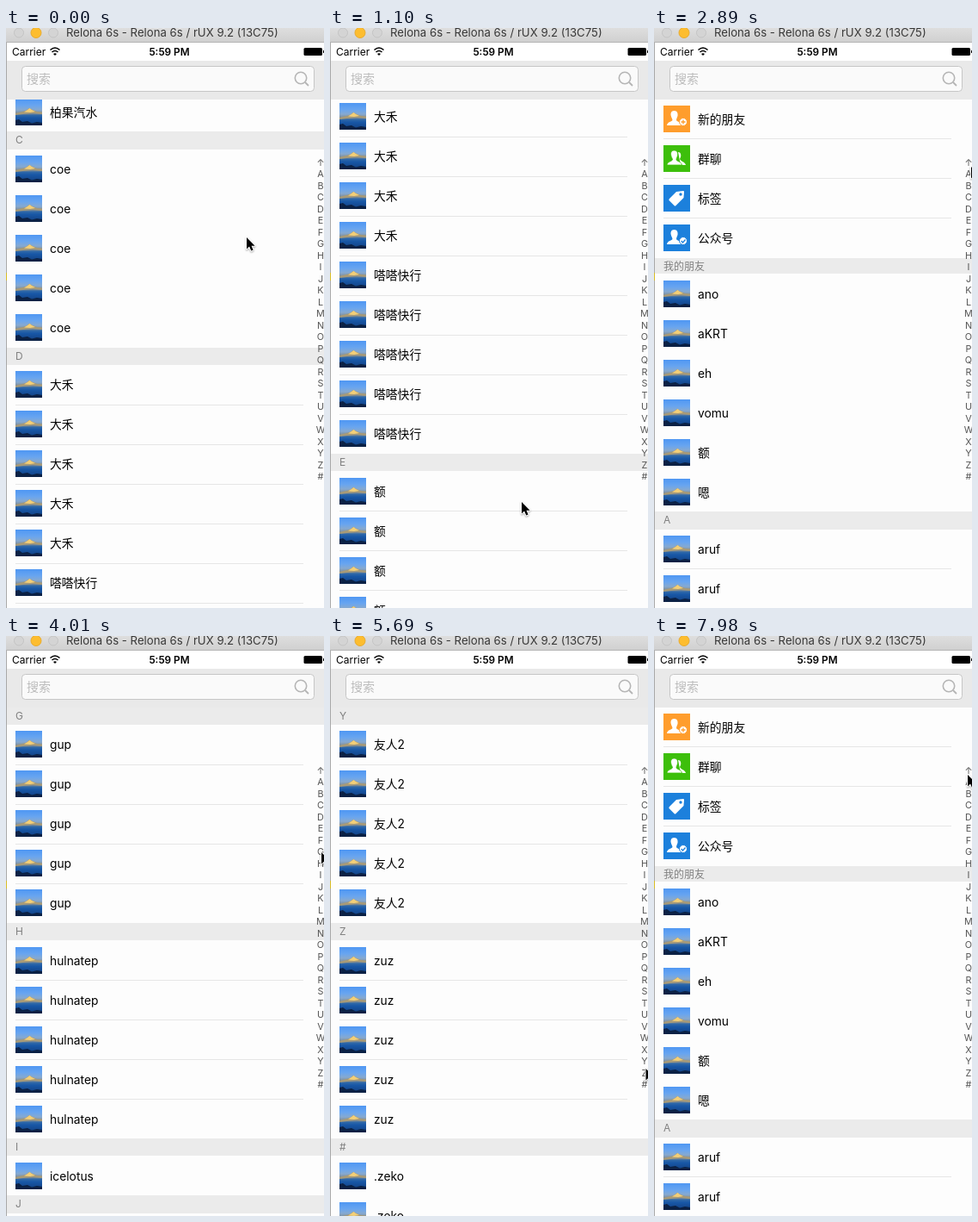
These frames come from a looping animation (370x673 px, 8 s). An HTML page with a canvas:

```html
<!DOCTYPE html>
<html lang="zh">
<head>
<meta charset="utf-8">
<style>
  html, body { margin: 0; width: 100%; height: 100%; overflow: hidden; background: #fff; }
  canvas { display: block; }
</style>
</head>
<body>
<canvas id="stage" width="370" height="673"></canvas>
<script>
const ctx = document.getElementById('stage').getContext('2d');
const FONTS = 'Inter, "Noto Sans CJK SC", sans-serif';
const LOOP = 8000, TOP = 82.6, ROW = 46, HEADER = 20.27, VIEW = 601;

// ---- Contact list ----
const repeat = (...names) => names.flatMap(name => Array(5).fill(name));
const sections = [
  { title: '', rows: ['新的朋友', '群聊', '标签', '公众号'], head: 0 },
  { title: '我的朋友', rows: ['ano', 'aKRT', 'eh', 'vomu', '额', '嗯'], head: 18.75 },
];
const groups = {
  A: repeat('aruf'), B: repeat('贝朵', '柏果汽水'), C: repeat('coe'), D: repeat('大禾', '嗒嗒快行'),
  E: repeat('额'), F: repeat('fum'), G: repeat('gup'), H: repeat('hulnatep'), I: ['icelotus'],
  J: repeat('jup'), K: repeat('kep'), L: repeat('lom'), M: repeat('mim'), N: repeat('nuo'),
  O: repeat('opu'), P: repeat('pem'), Q: repeat('qua'), R: repeat('rud'), S: repeat('sno'),
  T: repeat('tep'), U: repeat('umo'), V: repeat('vun'), W: repeat('wem'), X: repeat('xun'),
  Y: repeat('友人2'), Z: repeat('zuz'), '#': repeat('.zeko'),
};
for (const title in groups) sections.push({ title, rows: groups[title], head: HEADER });
let total = 0;
for (const s of sections) {
  s.top = total;
  total += s.head + s.rows.length * ROW;
}
const letters = ['↑', ...Object.keys(groups)];

// ---- Timeline: [time, value..., eased] ----
const pointer = [
  [0, 280, 243], [60, 280, 243], [840, 250, 380], [930, 236, 400], [1100, 223, 550],
  [1630, 304, 337], [1750, 304, 337], [2000, 290, 560], [2530, 290, 560], [2710, 362, 300],
  [2890, 369, 161], [2950, 369, 161], [3290, 367, 195], [3530, 367, 195], [4010, 367, 251],
  [4300, 367, 290], [4360, 367, 290], [4940, 367, 395], [5180, 367, 395], [5690, 367.5, 502],
  [5870, 367.5, 526], [5990, 367, 528], [6220, 367, 538], [6280, 372, 538], [6640, 372, 526],
  [6700, 367, 526], [7100, 349, 345], [7500, 366, 158], [7940, 366, 158], [7980, 365, 161],
];
const scroll = [
  [0, 1171.57], [60, 1171.57], [840, 1700, 1], [930, 1700], [1100, 1528.6],
  [1630, 437.15, 1], [1750, 437.15], [2530, 0, 1],
];

function sample(keys, t, column) {
  const i = keys.findIndex(k => k[0] > t);
  if (i < 0) return keys[keys.length - 1][column];
  const a = keys[i - 1], b = keys[i];
  let p = (t - a[0]) / (b[0] - a[0]);
  if (keys === scroll && b[2]) p = 1 - (1 - p) ** 3;
  return a[column] + (b[column] - a[column]) * p;
}

function scrollAt(t) {
  if (t < 2950) return sample(scroll, t, 1);
  if (t >= 7560) return 0;
  const y = sample(pointer, Math.min(t, 6000) - 40, 2);
  const i = Math.max(0, Math.min(letters.length - 1, Math.round((y - 155.5) / 13.5)));
  return Math.min(i ? sections[i + 1].top : 0, total - VIEW);
}

// The screen refreshes in coarse steps while things move.
function stepped(t) {
  if (t > 7500) return t;
  const [origin, step] = t < 2710 ? [1100, 81.25] : [2890, 56];
  return Math.max(0, origin + Math.floor((t - origin) / step) * step);
}

// ---- Drawing helpers ----
function rect(x, y, w, h, fill, c = ctx) {
  c.fillStyle = fill;
  c.fillRect(x, y, w, h);
}
function circle(x, y, r, fill, stroke) {
  ctx.beginPath();
  ctx.arc(x, y, r, 0, 7);
  if (fill) { ctx.fillStyle = fill; ctx.fill(); }
  if (stroke) { ctx.strokeStyle = stroke; ctx.stroke(); }
}
function path(d, fill, stroke, width = 1, c = ctx) {
  const p = new Path2D(d);
  if (fill) { c.fillStyle = fill; c.fill(p); }
  if (stroke) { c.strokeStyle = stroke; c.lineWidth = width; c.stroke(p); }
  c.lineWidth = 1;
}
function text(s, x, y, size, color, align = 'left', weight = 400) {
  ctx.font = `${weight} ${size}px ${FONTS}`;
  ctx.fillStyle = color;
  ctx.textAlign = align;
  ctx.fillText(s, x, y);
}

// Mountain lake thumbnail: sky, lit cloud band, blue slope, dark ridge.
const photo = document.createElement('canvas');
photo.width = photo.height = 31;
{
  const c = photo.getContext('2d');
  const sky = c.createLinearGradient(0, 0, 0, 31);
  [[0, '#4f97f3'], [.25, '#68a5f0'], [.42, '#86a9d0'], [.55, '#7e8c98'], [.62, '#2f68a8'], [.72, '#1857a6'], [1, '#123f80']]
    .forEach(([p, color]) => sky.addColorStop(p, color));
  rect(0, 0, 31, 31, sky, c);
  path('M0 17L6 15.500L12 14L16 11L20 13L25 15L31 15.500V18L20 17L9 18L0 19Z', '#a79a78', null, 1, c);
  path('M10 15.500L14 13L16.500 11L19 13L23 15L17 16Z', '#f3cf78', null, 1, c);
  path('M0 25L4 24L8 27L14 26L19 28.500L25 27L31 28V31H0Z', '#0b2145', null, 1, c);
}

const person = 'M12.5 6C16 6 17 9 16.5 12C16 14 15 15 15 17C16 19 21 19 21.500 23H4C4.500 19 9 19 10.500 17C10.500 15 9 14 8.800 12C8 9 9 6 12.500 6Z';
const icons = [
  () => {
    rect(0, 0, 31, 31, '#ff9d2c');
    path(person, '#fff');
    circle(23, 19, 4.5, '#fff', '#ff9d2c');
    path('M20.500 19H25.500M23 16.500V21.500', null, '#ff9d2c', 1.3);
  },
  () => {
    rect(0, 0, 31, 31, '#3dbf0b');
    path('M17 8C21 8 21 13 19 16C20 19 25 19 26 23H20Z', '#fff');
    path(person, '#fff', '#3dbf0b', .8);
  },
  () => {
    rect(0, 0, 31, 31, '#1c80dc');
    path('M15 8L23 7Q24 7 24 8L23.500 15L14.500 24Q13.500 25 12.500 24L6.500 18Q6 17 7 16Z', '#fff');
    circle(20, 11, 1.7, '#1c80dc');
  },
  () => {
    rect(0, 0, 31, 31, '#1c80dc');
    path(person, '#fff');
    circle(23, 19, 4.5, '#fff', '#1c80dc');
    path('M20.700 19L22.500 21L25.500 17.500', null, '#1c80dc', 1.3);
  },
];

function drawRow(section, i, y) {
  const top = Math.round(y + TOP + 7.5);
  if (section === sections[0]) {
    ctx.save();
    ctx.translate(11, top);
    icons[i]();
    ctx.restore();
  } else ctx.drawImage(photo, 11, top);
  text(section.rows[i], 51, top + 17, 13.8, '#000');
  // Hairlines survive only on matching subpixel positions.
  const end = y + ROW;
  if (i < section.rows.length - 1 && end - Math.floor(end) < .55)
    rect(11, Math.floor(end + TOP + .3), 335, 1, '#e6e6e6');
}

function drawList(offset) {
  rect(1, 83, 369, 590, '#fdfdfd');
  for (const s of sections) {
    const y = s.top - offset;
    if (y > 600 || y + s.head + s.rows.length * ROW < 0) continue;
    s.rows.forEach((_, i) => {
      const rowY = y + s.head + i * ROW;
      if (rowY > -ROW && rowY < 600) drawRow(s, i, rowY);
    });
    if (s.head) {
      const top = Math.round(y + TOP);
      rect(1, top, 369, Math.round(y + TOP + s.head) - top, '#ebebeb');
      text(s.title, 11, top + s.head / 2 + .7, 12, '#808080');
    }
  }
  letters.forEach((s, i) => text(s, 366, 156.5 + i * 13.5, 10.8, '#555', 'center'));
}

function drawChrome() {
  const bar = ctx.createLinearGradient(0, 0, 0, 16);
  bar.addColorStop(0, '#dedede');
  bar.addColorStop(1, '#d0d0d0');
  rect(0, 0, 370, 16, bar);
  rect(0, 16, 370, 1, '#b4b4b4');
  circle(15, 5.5, 5.5, '#d4d4d4', '#c4c4c4');
  circle(35, 5.5, 6, '#fdbd2f', '#e9ab2b');
  circle(55, 5.5, 5.5, '#d4d4d4', '#c4c4c4');
  text('Relona 6s - Relona 6s / rUX 9.2 (13C75)', 70, 6.5, 13.2, '#383838');

  rect(1, 17, 369, 21, '#fff');
  text('Carrier', 7, 28, 12, '#000');
  path('M51.500 25.500Q57 20.500 62.500 25.500M53.500 28Q57 25 60.500 28', null, '#000', 1.6);
  path('M55 30Q57 28.500 59 30L57 32Z', '#000');
  text('5:59 PM', 190, 28, 11.8, '#000', 'center', 600);
  ctx.beginPath();
  ctx.roundRect(346.5, 23, 21.5, 9, 1.5);
  ctx.fill();
  rect(369, 26, 1, 3, '#000');

  rect(1, 38, 369, 45, '#e9e9e9');
  ctx.beginPath();
  ctx.roundRect(18.5, 44.5, 340, 29, 4);
  ctx.fillStyle = '#fafafa';
  ctx.fill();
  ctx.strokeStyle = '#c6c6c6';
  ctx.stroke();
  text('搜索', 24, 60, 14, '#bbb');
  ctx.lineWidth = 1.6;
  circle(343, 58, 6.7, null, '#b5b5b5');
  path('M348 63L352 67', null, '#b5b5b5', 1.8);

  rect(0, 17, 1, 656, '#a9a9a9');
  rect(0, 284, 1, 9, '#d8bd24');
}

function drawPointer(x, y) {
  const arrow = 'M0 0V13.500L3.100 10.600L5.300 15.600L7.600 14.600L5.500 9.700H9.600Z';
  ctx.save();
  ctx.translate(x, y);
  ctx.lineJoin = 'round';
  ctx.shadowColor = '#0005';
  ctx.shadowBlur = 2;
  ctx.shadowOffsetY = 1;
  path(arrow, null, '#fff', 2);
  ctx.shadowColor = 'transparent';
  path(arrow, '#000');
  ctx.restore();
}

function draw(now) {
  const t = stepped(now % LOOP);
  ctx.textBaseline = 'middle';
  drawList(scrollAt(t));
  drawChrome();
  drawPointer(sample(pointer, t, 1), sample(pointer, t, 2));
  requestAnimationFrame(() => draw(performance.now() - start));
}
const start = performance.now();
draw(0);
</script>
</body>
</html>
```
